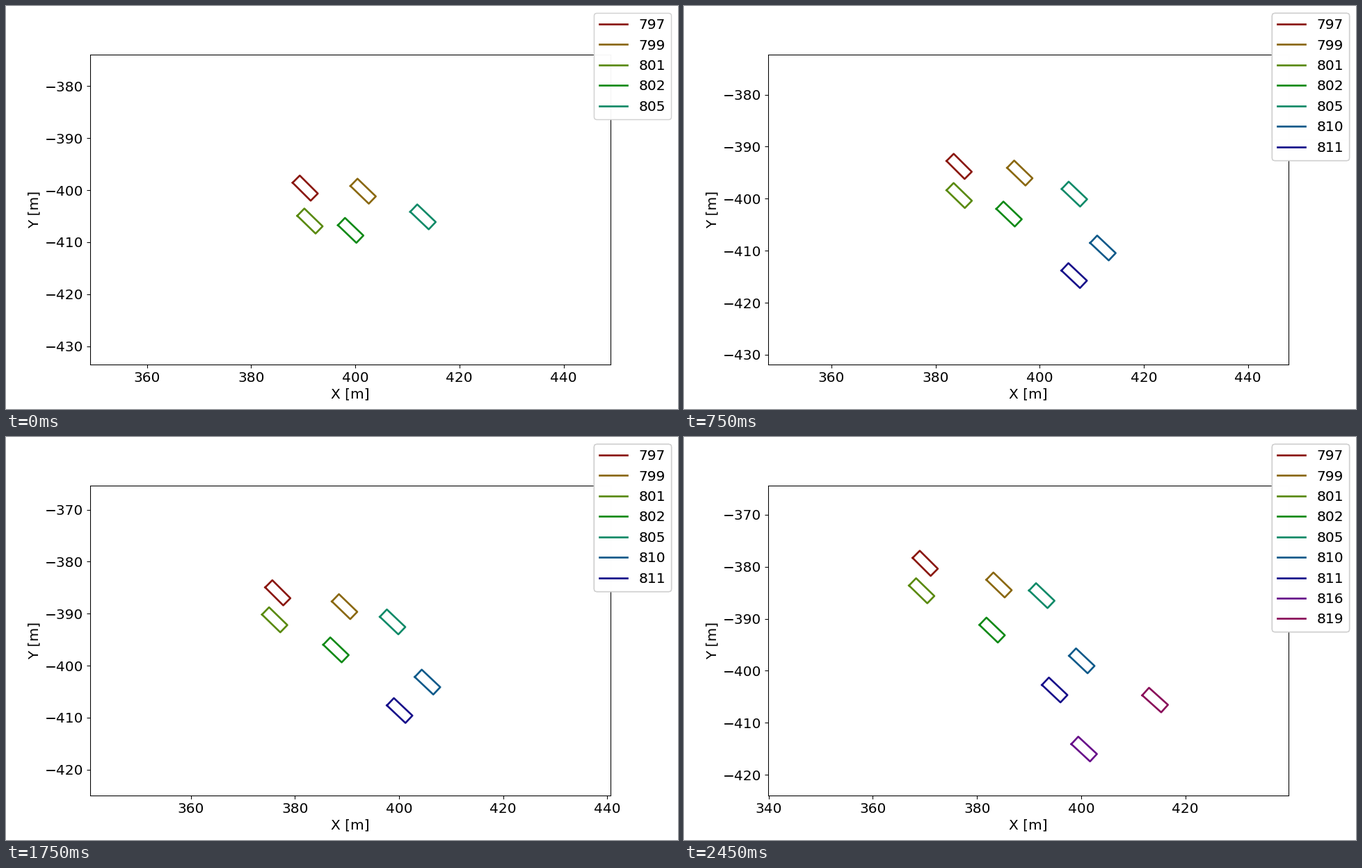
A matplotlib script for the animation above (2.5 s loop, 966 px wide and 580 px high).

```python
import colorsys

import matplotlib.pyplot as plt
import numpy as np
from matplotlib.animation import FuncAnimation
from matplotlib.ticker import MultipleLocator

W, H, DPI = 966, 580, 96
FRAMES, INTERVAL = 50, 50
CAR_LENGTH, CAR_WIDTH = 4.9, 1.95
HALF_VIEW = 50
LEGEND_LAYERS = 5

SKIPS = (12, 39, 41)


def clock(frame):
    return frame + sum(frame >= s for s in SKIPS)


class Car:
    """A car that drives straight up and to the left from where it appears."""

    def __init__(self, name, enter, x, y, heading, speed, accel=0):
        self.name, self.enter = name, enter
        self.start = np.array([x, y])
        self.speed, self.accel = speed, accel

        a = np.radians(180 - heading)
        self.ahead = np.array([np.cos(a), np.sin(a)])
        along = CAR_LENGTH / 2 * self.ahead
        left = CAR_WIDTH / 2 * np.array([-np.sin(a), np.cos(a)])
        self.outline = np.array([along + left, along - left, -along - left,
                                 left - along, along + left])

    def position(self, frame):
        t = clock(frame) - clock(self.enter)
        return self.start + self.ahead * (self.speed * t + self.accel * t * t)


cars = [
    Car(797, 0, 390.39, -399.61, 44.9, 0.500, accel=0.001),
    Car(799, 0, 401.51, -400.20, 44.0, 0.462),
    Car(801, 0, 391.30, -405.94, 44.2, 0.588),
    Car(802, 0, 399.12, -407.73, 43.8, 0.432),
    Car(805, 0, 413.00, -405.14, 43.6, 0.546),
    Car(810, 10, 414.16, -411.37, 43.4, 0.460),
    Car(811, 12, 407.61, -415.70, 43.4, 0.448),
    Car(816, 39, 404.20, -418.42, 42.9, 0.450),
    Car(819, 41, 417.17, -408.31, 42.0, 0.500),
]

plt.rcParams.update({"font.family": "DejaVu Sans", "font.size": 15.1,
                     "legend.labelspacing": 0.517})
fig, ax = plt.subplots(figsize=(W / DPI, H / DPI), dpi=DPI)
fig.subplots_adjust(left=0.125, right=0.9, bottom=0.11, top=0.88)
ax.set_xlabel("X [m]")
ax.set_ylabel("Y [m]")
ax.xaxis.set_major_locator(MultipleLocator(20))
ax.yaxis.set_major_locator(MultipleLocator(10))

for k, car in enumerate(cars):
    color = colorsys.hls_to_rgb(0.01 + k / len(cars), 0.3, 0.8)
    car.line, = ax.plot([], [], color=color, lw=2, label=str(car.name))


def present(frame):
    return [c for c in cars if c.enter <= max(frame, 0)]


def draw_legends(frame):
    """Stack the latest translucent legends, newest on top."""
    for old in list(fig.legends):
        old.remove()
    for k in range(max(frame - LEGEND_LAYERS + 1, -1), frame + 1):
        fig.legend(handles=[c.line for c in present(k)], loc="upper right")


def update(frame):
    shown = present(frame)
    for car in cars:
        car.line.set_visible(car in shown)
    spots = [car.position(frame) for car in shown]
    for car, spot in zip(shown, spots):
        car.line.set_data(*(car.outline + spot).T)

    # The view follows the mean position of all cars.
    cx, cy = np.mean(spots, axis=0)
    half_h = HALF_VIEW * (0.77 * H) / (0.775 * W)
    ax.set_xlim(cx - HALF_VIEW, cx + HALF_VIEW)
    ax.set_ylim(cy - half_h, cy + half_h)
    draw_legends(frame)
    return [car.line for car in shown]


anim = FuncAnimation(fig, update, frames=FRAMES, interval=INTERVAL,
                     init_func=lambda: update(0), repeat=True, repeat_delay=0)
plt.show()
```
